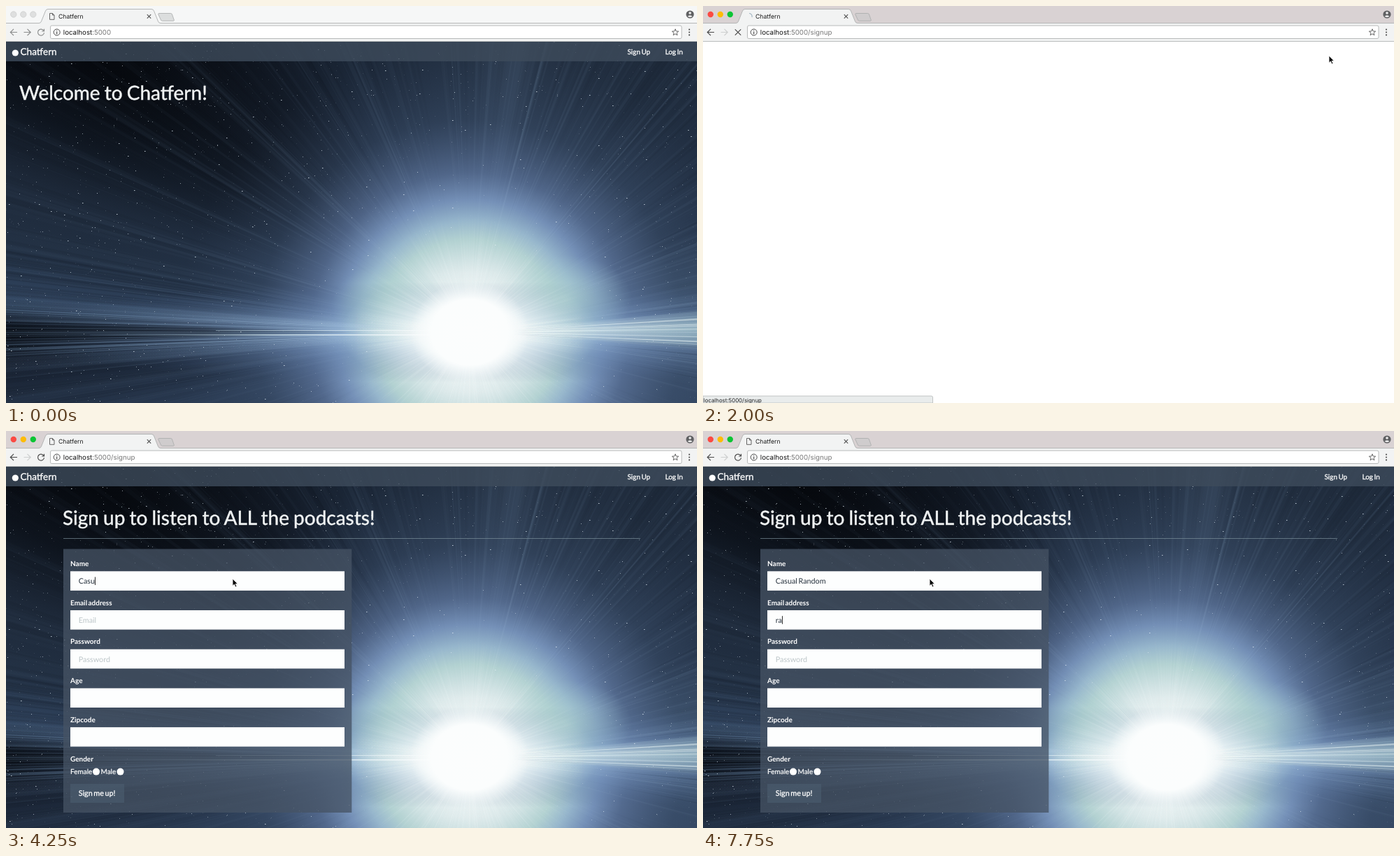
An HTML page with a canvas that plays this animation: 988 px wide and 567 px high, repeating every 8 s.

```html
<!DOCTYPE html>
<html lang="en">
<head>
<meta charset="utf-8">
<title>Chatfern</title>
<style>
html, body { margin: 0; width: 100%; height: 100%; overflow: hidden; background: #fff; }
canvas, svg { position: absolute; left: 0; top: 0; display: block; }
svg { text-rendering: geometricPrecision; }
text { white-space: pre; }
.ui { font-family: Inter, Roboto, sans-serif; }
.page { font-family: Lato, sans-serif; fill: #fff; word-spacing: -.065em; }
.h1 { font-size: 28px; fill: #f1f4f4; stroke: #f1f4f4; stroke-width: .45; }
.brand { font-size: 13.6px; stroke: #fff; stroke-width: .3; }
.nav { font-size: 9.95px; stroke: #fff; stroke-width: .3; }
.label { font-size: 10px; font-weight: 700; }
.small { font-size: 10px; stroke: #fff; stroke-width: .2; }
.field { font-size: 10.75px; }
.line { fill: none; stroke-width: 1.2; }
</style>
</head>
<body>
<canvas id="sky" width="988" height="567"></canvas>
<svg width="988" height="567" viewBox="0 0 988 567">
  <rect id="blank" y="51" width="988" height="516" fill="#fff"/>

  <g id="page" class="page">
    <rect y="51" width="988" height="28" fill="rgb(62,76,92)" fill-opacity=".8"/>
    <rect id="hover" x="879" y="51" width="53" height="28" fill="#fff" fill-opacity=".13"/>
    <circle cx="13.3" cy="67" r="4.6"/>
    <text class="brand" x="20.5" y="70.4">Chatfern</text>
    <text class="nav" x="888.5" y="69.2">Sign Up</text>
    <text class="nav" x="942.5" y="69.2">Log In</text>

    <text id="welcome" class="h1" x="19" y="134">Welcome to Chatfern!</text>

    <g id="form">
      <text class="h1" x="81" y="133.7">Sign up to listen to ALL the podcasts!</text>
      <rect x="82" y="153" width="825" height=".8" fill="#7d919c" fill-opacity=".85"/>
      <rect x="82" y="168.5" width="412.3" height="376.5" fill="rgb(70,84,100)" fill-opacity=".76"/>
      <g id="rows"></g>
      <text class="label" x="92" y="471.6">Gender</text>
      <text class="small" x="92" y="489.6">Female</text>
      <circle cx="129" cy="486.6" r="5"/>
      <text class="small" x="135.5" y="489.6">Male</text>
      <circle cx="163.5" cy="486.6" r="5"/>
      <rect x="92" y="504" width="77" height="27" fill="rgb(76,94,112)" fill-opacity=".6"/>
      <text class="field" stroke="#fff" stroke-width=".3" x="103.7" y="521">Sign me up!</text>
      <rect id="caret" width=".9" height="11.5" fill="#111"/>
    </g>
  </g>

  <g id="status" class="ui">
    <path d="M0 557H326.500Q328.500 557 328.500 559V567H0Z" fill="#e9ecec" stroke="#b4b8b8" stroke-width=".8"/>
    <text x=".8" y="565.600" font-size="7.85" fill="#222">localhost:5000/signup</text>
  </g>

  <g id="chrome" class="ui">
    <rect id="strip" width="988" height="25"/>
    <rect y="24" width="988" height="27" fill="#f2f3f3"/>
    <path d="M0 24.500H47Q49.500 24.500 50.500 22L56.500 7Q57.500 4.500 60 4.500H208Q210.500 4.500 211.500 7L217.500 22Q218.500 24.500 221 24.500H988" fill="#f2f3f3" stroke="#aeb0b0" stroke-width=".9"/>
    <path id="newTab" d="M219 10.500H235.500Q237 10.500 237.500 12L240.300 20Q240.500 21.300 239.500 21.300H223.500Q222 21.300 221.500 20L217.800 12Q217.500 10.500 219 10.500Z" stroke="#a9abab" stroke-width=".8"/>
    <rect y="50" width="988" height="1" fill="#b9bcbc"/>
    <g id="lights" stroke-width=".7"></g>
    <path id="doc" class="line" d="M62.500 10.500H66.500L69 13V19.300H62.500ZM66.500 10.500V13H69" stroke="#555" style="stroke-width:.9"/>
    <path id="loader" class="line" d="M66 10.500A4.300 4.300 0 0 1 70 16" stroke="#9fb3c2"/>
    <text x="75" y="17.800" font-size="8.700" fill="#1c1c1c">Chatfern</text>
    <path class="line" d="M201.800 12.200L207.200 17.600M207.200 12.200L201.800 17.600" stroke="#555"/>
    <circle cx="978" cy="12" r="5.600" fill="#5f6062"/>
    <circle cx="978" cy="10" r="1.800" fill="#eee"/>
    <path d="M974.500 14.800Q978 11.800 981.500 14.800Q978 17.300 974.500 14.800Z" fill="#eee"/>

    <path id="back" class="line" d="M16 37.500H6.500M11 32.800L6.300 37.500L11 42.200"/>
    <path id="fwd" class="line" d="M25.500 37.500H35M30.500 32.800L35.200 37.500L30.500 42.200"/>
    <path id="reload" class="line" d="M53.800 35.200A4.500 4.500 0 1 0 54.500 38.200M54.500 32.700V36H51.200"/>
    <path id="stop" class="line" d="M45.800 33.300L54.200 41.700M54.200 33.300L45.800 41.700" stroke="#4a4a4a"/>
    <rect x="63.500" y="28" width="902.500" height="18.500" rx="2" fill="#fff" stroke="#b0b3b3" stroke-width=".9"/>
    <circle class="line" cx="72.700" cy="37.500" r="4.500" stroke="#444" style="stroke-width:1"/>
    <path class="line" d="M72.700 36.700V40.200M72.700 34.700V35.800" stroke="#444"/>
    <text x="81.800" y="41" font-size="9.700" fill="#111">localhost<tspan id="path" fill="#757575"></tspan></text>
    <path id="star" class="line" stroke="#555" style="stroke-width:.9"/>
    <g fill="#555"><circle cx="977" cy="33.600" r="1.100"/><circle cx="977" cy="37.500" r="1.100"/><circle cx="977" cy="41.400" r="1.100"/></g>
  </g>

  <path id="cursor" d="M0 0V10.300L2.400 8.100L4.100 11.900L5.900 11.100L4.200 7.400H7.300Z" fill="#0a0a0a" stroke="#fff" stroke-width=".8"/>
</svg>

<script>
const LOOP = 8000;
const $ = id => document.getElementById(id);
const show = (el, on) => { el.style.display = on ? '' : 'none'; };

// ---- Light burst behind the page ----
function paintSky() {
  const c = $('sky').getContext('2d');
  const W = 988, H = 567, X = 663, Y = 466;
  let seed = 41;
  const rnd = () => (seed = (seed * 16807) % 2147483647) / 2147483647;
  const radial = (x, y, r, stops) => {
    const g = c.createRadialGradient(x, y, 0, x, y, r);
    stops.forEach(([at, rgba]) => g.addColorStop(at, `rgba(${rgba})`));
    return g;
  };
  const fill = style => {
    c.fillStyle = style;
    c.fillRect(0, 0, W, H);
  };
  const glow = (x, y, rx, ry, stops) => {
    c.save();
    c.translate(x, y);
    c.scale(1, ry / rx);
    c.fillStyle = radial(0, 0, rx, stops);
    c.fillRect(-rx, -rx, rx * 2, rx * 2);
    c.restore();
  };
  const wedge = (angle, spread, from, to, style, alpha) => {
    const p = (r, a) => [X + r * Math.cos(a), Y + r * Math.sin(a)];
    c.globalAlpha = alpha;
    c.fillStyle = style;
    c.beginPath();
    c.moveTo(...p(from, angle));
    c.lineTo(...p(to, angle - spread));
    c.lineTo(...p(to, angle + spread));
    c.fill();
    c.globalAlpha = 1;
  };
  // Stacked thin wedges give a beam soft edges
  const softWedge = (angle, spread, from, to, style, alpha) => {
    for (let i = 1; i <= 8; i++) wedge(angle, spread * i / 8, from, to, style, alpha / 8);
  };

  const far = c.createConicGradient(0, X, Y);
  [[0, '100,130,160'], [.04, '62,84,114'], [.12, '50,70,96'], [.25, '60,80,108'],
   [.4, '36,51,72'], [.46, '48,66,92'], [.487, '24,34,50'], [.5, '6,10,16'],
   [.511, '48,68,96'], [.53, '34,48,67'], [.55, '31,43,60'], [.575, '13,19,28'],
   [.6, '4,6,10'], [.64, '7,10,16'], [.68, '20,29,42'], [.75, '34,46,62'],
   [.779, '60,76,96'], [.79, '36,48,64'], [.85, '28,39,54'], [.93, '36,50,70'],
   [1, '100,130,160']].forEach(([at, rgb]) => far.addColorStop(at, `rgb(${rgb})`));
  fill(far);

  fill(radial(X, Y, 760, [
    [0, '250,252,252,1'], [.075, '246,250,250,1'], [.1, '232,240,241,1'],
    [.135, '208,226,227,1'], [.175, '178,209,209,1'], [.21, '150,182,204,1'],
    [.25, '118,146,186,.97'], [.3, '86,109,146,.9'], [.4, '54,73,100,.7'],
    [.55, '36,51,72,.4'], [.8, '26,38,54,.12'], [1, '20,30,44,0']]));

  // Flat glow along the horizon, with green fringes at both sides
  glow(X, Y, 700, 72, [[0, '180,210,225,.9'], [.25, '150,182,214,.75'],
    [.5, '112,142,184,.5'], [1, '70,95,135,0']]);
  const teal = [[0, '178,214,210,.65'], [.5, '170,208,208,.35'], [1, '160,200,205,0']];
  glow(550, 428, 85, 60, teal);
  glow(800, 418, 95, 62, teal);
  glow(X, Y, 185, 85, [[0, '250,252,252,1'], [.4, '245,250,250,.9'],
    [.7, '225,238,238,.45'], [1, '190,218,218,0']]);

  const light = radial(X, Y, 950, [[0, '255,255,255,0'], [.08, '235,245,245,.5'],
    [.2, '165,195,222,1'], [.5, '125,158,192,.7'], [1, '90,120,155,0']]);
  const dark = radial(X, Y, 950, [[0, '4,8,16,0'], [.18, '30,50,80,.15'],
    [.4, '4,8,16,.8'], [1, '2,4,8,1']]);
  const white = radial(X, Y, 170, [[0, '255,255,255,1'], [.4, '250,253,253,.9'],
    [1, '215,235,235,0']]);
  for (let i = 0; i < 1000; i++) {
    const flat = rnd() < .35;
    const a = flat
      ? (rnd() < .5 ? 0 : Math.PI) + (rnd() + rnd() - 1) * .22
      : rnd() * Math.PI * 2;
    const spread = .0008 + rnd() * (flat ? .003 : .008);
    const isLight = rnd() < .5;
    wedge(a, spread, 60 + rnd() * 170, 1100, isLight ? light : dark,
      (isLight ? .02 : .03) + rnd() * (flat ? .1 : .055));
    wedge(a, .006, 20, 170, white, .1);
  }

  // Horizontal beam
  softWedge(Math.PI, .03, 150, 800, dark, 1.1);
  softWedge(Math.PI + .06, .035, 80, 800, light, .4);
  softWedge(Math.PI - .065, .035, 80, 800, light, .18);
  const beam = radial(X, Y, 335, [[0, '255,255,255,1'], [.3, '240,248,248,.95'], [1, '178,212,216,.85']]);
  softWedge(-.01, .085, 30, 340, beam, 1);
  for (let i = 0; i < 26; i++) {
    wedge((rnd() - .55) * .13, .0025, 60, 340, rnd() < .6 ? '#f4fbfa' : '#7c9cb4', .35);
    wedge(Math.PI + (rnd() - .5) * .1, .0011, 80, 800, light, .4);
  }
  const streak = c.createLinearGradient(620, 0, 120, 0);
  streak.addColorStop(0, '#fff');
  streak.addColorStop(.5, 'rgba(215,235,240,.8)');
  streak.addColorStop(1, 'rgba(140,175,205,.1)');
  c.fillStyle = streak;
  c.fillRect(120, 469, 500, 1.4);
  c.fillRect(300, 463, 320, .7);

  glow(X, Y, 85, 72, [[0, '252,253,253,1'], [.65, '251,253,253,1'], [1, '245,250,250,0']]);

  // Stars thin out toward the core
  c.fillStyle = '#dfeaf2';
  for (let i = 0; i < 3000; i++) {
    const x = Math.floor(rnd() * W), y = 51 + Math.floor(rnd() * (H - 51)), s = rnd();
    const d = Math.hypot(x - X, y - Y);
    if (d < 130 || rnd() > d / 560) continue;
    c.globalAlpha = .1 + .75 * s * s * s;
    c.fillRect(x, y, s > .95 ? 1.5 : 1, 1);
  }
  c.globalAlpha = 1;
}

// ---- Static parts made from rules ----
const svgEl = (tag, attrs, parent) => {
  const el = document.createElementNS('http://www.w3.org/2000/svg', tag);
  for (const k in attrs) el.setAttribute(k, attrs[k]);
  parent.append(el);
  return el;
};

const hints = ['Name', 'Email', 'Password', '', ''];
const fields = ['Name', 'Email address', 'Password', 'Age', 'Zipcode'].map((name, i) => {
  const y = 200.3 + i * 55.7;
  svgEl('text', { class: 'label', x: 92, y: y - 7.4 }, $('rows')).textContent = name;
  svgEl('rect', { x: 92, y, width: 392, height: 27.6, fill: '#fdfefe' }, $('rows'));
  return svgEl('text', { class: 'field', x: 103.8, y: y + 18.1 }, $('rows'));
});

const lightColors = ['#fb4a43', '#fdbc06', '#0bc534'];
const lights = lightColors.map((_, i) => svgEl('circle', { cx: 10.8 + i * 14, cy: 12, r: 4.2 }, $('lights')));

$('star').setAttribute('d', 'M' + Array.from({ length: 10 }, (_, i) => {
  const r = i % 2 ? 2.1 : 4.9, a = (i / 5 - .5) * Math.PI;
  return (957 + r * Math.cos(a)).toFixed(2) + ' ' + (37.7 + r * Math.sin(a)).toFixed(2);
}).join('L') + 'Z');

// ---- Timeline ----
const NAME = 'Casual Random', MAIL = 'ra';
const cursorSteps = [[0, null], [750, [862, 81]], [1000, [886, 76]], [1250, [895, 71]],
  [2500, [610, 140]], [2750, [350, 180]], [3000, [324, 211]]];
const nameSteps = [[0, 0], [3750, 1], [4000, 3], [4250, 4], [4500, 6], [5000, 7],
  [5250, 8], [5500, 9], [5750, 10], [6000, 11], [6500, 12], [6750, 13]];
const mailSteps = [[0, 0], [7750, 2]];
const caretSteps = [[0, -1], [3250, 0], [7000, 1], [7250, -1], [7500, 1]];
const at = (steps, t) => steps.reduce((v, [start, next]) => t >= start ? next : v, null);

function setField(i, value) {
  fields[i].textContent = value || hints[i];
  fields[i].setAttribute('fill', value ? '#26313d' : '#bcc5c8');
}

function render(t) {
  const active = t >= 500;
  const loading = t >= 2000 && t < 2250;
  const signup = t >= 2000;

  $('strip').setAttribute('fill', active ? '#d9d2d3' : '#f6f7f7');
  $('newTab').setAttribute('fill', active ? '#cfcccd' : '#dcdede');
  lights.forEach((el, i) => {
    el.setAttribute('fill', active ? lightColors[i] : '#dedfdf');
    el.setAttribute('stroke', active ? 'none' : '#cbcccc');
  });
  const ink = active ? '#4a4a4a' : '#8b8d8d';
  $('back').setAttribute('stroke', ink);
  $('reload').setAttribute('stroke', ink);
  $('fwd').setAttribute('stroke', signup ? '#cdcfcf' : ink);
  $('path').textContent = signup ? ':5000/signup' : ':5000';

  show($('doc'), !loading);
  show($('loader'), loading);
  show($('reload'), !loading);
  show($('stop'), loading);
  show($('blank'), loading);
  show($('page'), !loading);
  show($('welcome'), !signup);
  show($('form'), signup);
  show($('hover'), t >= 1000 && t < 2000);
  show($('status'), t >= 1750 && t < 2500);

  const pos = at(cursorSteps, t);
  show($('cursor'), pos);
  if (pos) $('cursor').setAttribute('transform', `translate(${pos})`);

  const typed = [NAME.slice(0, at(nameSteps, t)), MAIL.slice(0, at(mailSteps, t))];
  typed.forEach((value, i) => setField(i, value));
  setField(2, '');

  const focus = at(caretSteps, t);
  show($('caret'), focus >= 0);
  if (focus >= 0) {
    const width = typed[focus] ? fields[focus].getComputedTextLength() : 0;
    $('caret').setAttribute('x', 103.8 + width);
    $('caret').setAttribute('y', 208.5 + focus * 55.7);
  }
}

paintSky();
const start = performance.now();
function tick() {
  render((performance.now() - start) % LOOP);
  requestAnimationFrame(tick);
}
tick();
</script>
</body>
</html>
```
